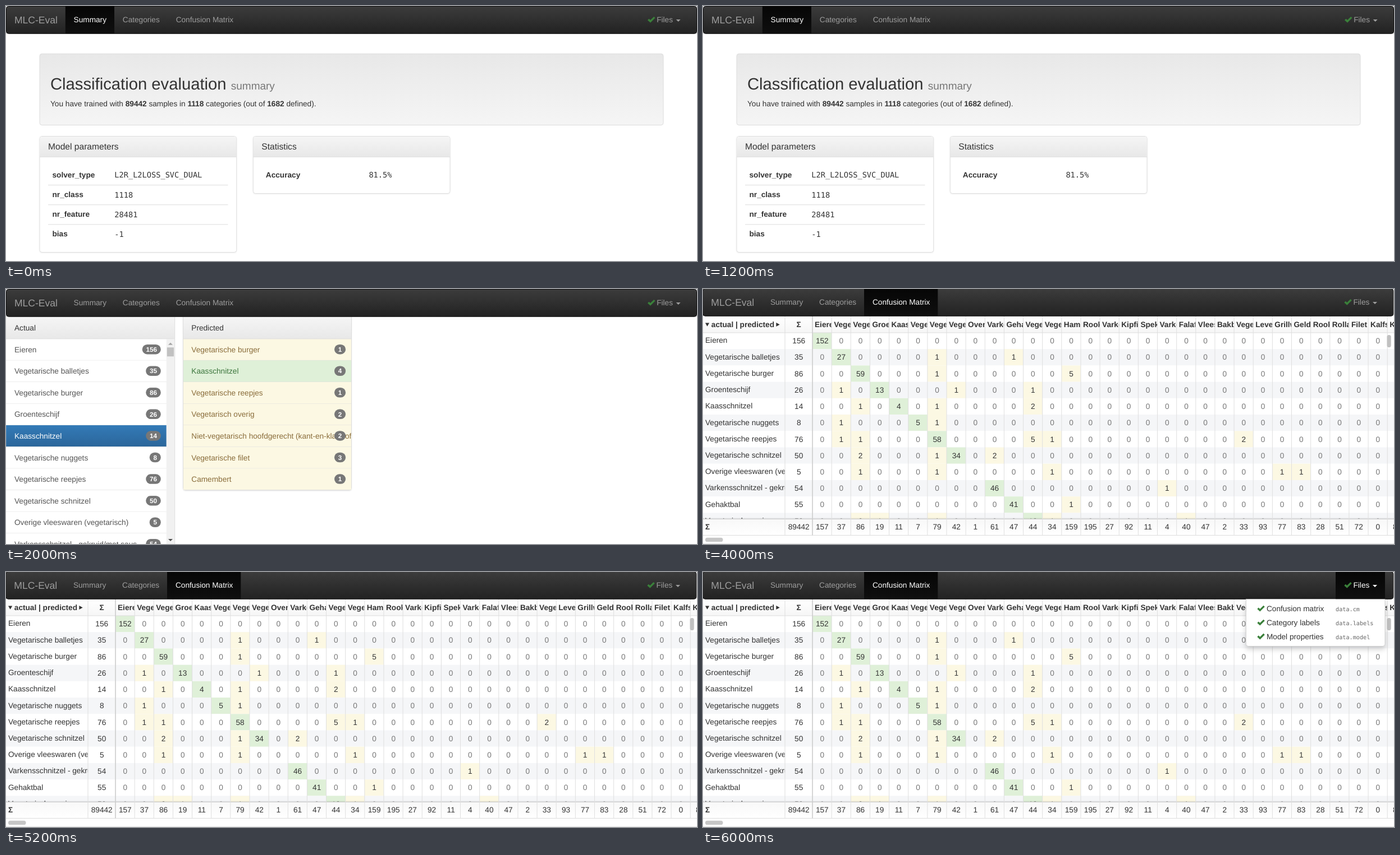
Recreate the animation shown at these times as an HTML page. Size 1231 by 455 pixels, loop 8000 ms.

```html
<!DOCTYPE html>
<html lang="en">
<head>
<meta charset="utf-8">
<title>MLC-Eval</title>
<style>
html, body { margin: 0; width: 100%; height: 100%; overflow: hidden; background: #fff; }
svg { display: block; width: 100%; height: 100%; }
text { font: 13.65px "Liberation Sans", Arial, sans-serif; fill: #333; text-rendering: geometricPrecision; }
.b { font-weight: 700; }
.mono { font-family: "DejaVu Sans Mono", monospace; }
.mid { text-anchor: middle; }
.h2 { font-size: 29.24px; }
.sub { font-size: 19px; fill: #777; }
.h3 { font-size: 15.6px; }
.brand { font-size: 17.55px; }
.nav { fill: #9d9d9d; }
.on { fill: #fff; }
.item { fill: #555; }
.warn { fill: #8a6d3b; }
.ok { fill: #3c763d; }
.zero { fill: #777; }
.file { font-size: 10.2px; fill: #666; }
.badge { font-size: 11.7px; font-weight: 700; fill: #fff; text-anchor: middle; }
.well { filter: drop-shadow(0 1px 1px rgba(0,0,0,.06)); }
.menu { filter: drop-shadow(0 5px 5px rgba(0,0,0,.18)); }
#summary, #categories, #files { animation: quarter 8s step-end infinite; }
#categories { animation-delay: -6s; }
#files { animation-delay: -2s; }
#matrix { animation: half 8s step-end -4s infinite; }
@keyframes quarter { 0% { visibility: visible; } 25%, 100% { visibility: hidden; } }
@keyframes half { 0% { visibility: visible; } 50%, 100% { visibility: hidden; } }
</style>
</head>
<body>
<svg viewBox="0 0 1231 455" preserveAspectRatio="none">
  <defs id="defs"></defs>
  <g id="summary"></g>
  <g id="categories"></g>
  <g id="matrix"></g>
  <g id="files"></g>
</svg>
<script>
const $ = id => document.getElementById(id);
const text = (x, y, s, cls = '') => `<text x="${x}" y="${y}" class="${cls}">${s}</text>`;
const rect = (x, y, w, h, fill, extra = '') =>
  `<rect x="${x}" y="${y}" width="${w}" height="${h}" fill="${fill}" ${extra}/>`;
const path = (d, fill, extra = '') => `<path d="${d}" fill="${fill}" ${extra}/>`;
const hline = (x, y, w, color = '#ddd') => rect(x, y - .5, w, 1, color);
const vline = (x, y, h, color = '#ddd') => rect(x - .5, y, 1, h, color);
const clip = (id, x, y, w, h) => `<clipPath id="${id}">${rect(x, y, w, h, '#000')}</clipPath>`;
const clipped = (id, body) => `<g clip-path="url(#${id})">${body}</g>`;
const gradient = (id, from, to) => `<linearGradient id="${id}" x2="0" y2="1">
  <stop stop-color="${from}"/><stop offset="1" stop-color="${to}"/></linearGradient>`;
const check = (x, y) =>
  path(`M${x} ${y + 6.2}l2.4 -2.5 2.6 2.4 6.2 -6.1 2.3 2.3 -8.5 8.5z`, '#3a803a');

// Navigation bar
const tabs = [['Summary', 120.6, 105.8, 87.2], ['Categories', 207.8, 193, 95], ['Confusion Matrix', 302.7, 287.7, 131.3]];

function filesTab(cls) {
  return check(1143, 19) + text(1159.2, 29.2, 'Files', cls) +
    path('M1193.7 23.9h8l-4 4z', cls === 'on' ? '#fff' : '#9d9d9d');
}

function navbar(active) {
  let s = rect(.5, .5, 1230, 48.8, 'url(#bar)', 'rx="4" stroke="#101010"');
  s += text(15, 30.6, 'MLC-Eval', 'nav brand');
  tabs.forEach(([name, x, left, width], i) => {
    if (i === active) s += rect(left, .5, width, 48.5, 'url(#tab)');
    s += text(x, 29.2, name, i === active ? 'on' : 'nav');
  });
  return s + filesTab('nav');
}

// Summary page
function panel(x, height, title, rows, valueX) {
  let s = rect(x, 232.5, 350.7, height, '#fff', 'rx="4" stroke="#ddd" class="well"');
  s += path(`M${x + .5} 269V236q0 -3 3 -3h343.7q3 0 3 3V269z`, 'url(#head)');
  s += hline(x, 269.3, 350.7) + text(x + 15, 256, title, 'h3');
  rows.forEach(([key, value], i) => {
    const y = 306 + i * 35.15;
    if (i) s += hline(x + 15, y - 21.6, 320.5);
    s += text(x + 22.5, y - .4, key, 'b') + text(valueX, y + .4, value, 'mono');
  });
  return s;
}

function summary() {
  return navbar(0) +
    rect(60, 85.3, 1111, 127.2, 'url(#jumbo)', 'rx="4" stroke="#dcdcdc"') +
    text(79, 149.4, 'Classification evaluation <tspan class="sub">summary</tspan>', 'h2') +
    text(79, 179.2, 'You have trained with <tspan class="b">89442</tspan> samples in ' +
      '<tspan class="b">1118</tspan> categories (out of <tspan class="b">1682</tspan> defined).') +
    panel(60, 207, 'Model parameters', [['solver_type', 'L2R_L2LOSS_SVC_DUAL'],
      ['nr_class', '1118'], ['nr_feature', '28481'], ['bias', '-1']], 193.3) +
    panel(440.3, 102, 'Statistics', [['Accuracy', '81.5%']], 646.4);
}

// Categories page
const step = 38.57;
const actual = [['Eieren', 156], ['Vegetarische balletjes', 35], ['Vegetarische burger', 86],
  ['Groenteschijf', 26], ['Kaasschnitzel', 14], ['Vegetarische nuggets', 8],
  ['Vegetarische reepjes', 76], ['Vegetarische schnitzel', 50],
  ['Overige vleeswaren (vegetarisch)', 5], ['Varkensschnitzel - gekruid/met saus', 54]];
const predicted = [['Vegetarische burger', 1], ['Kaasschnitzel', 4], ['Vegetarische reepjes', 1],
  ['Vegetarisch overig', 2], ['Niet-vegetarisch hoofdgerecht (kant-en-klaar of bereid)', 2],
  ['Vegetarische filet', 3], ['Camembert', 1]];

function badge(right, y, n) {
  const w = 13.6 + 6.51 * String(n).length;
  return rect(right - w, y - 8.8, w, 17.5, '#777', 'rx="8.75"') + text(right - w / 2, y + 4.2, n, 'badge');
}

function list(items, x, width, look) {
  return items.map(([name, n], i) => {
    const y = 88.8 + i * step, [fill, cls] = look(i);
    return rect(x, y, width, step, fill) + hline(x, y + step, width) +
      text(x + 14.8, y + 23.9, name, cls) + badge(x + width - 10, y + 18.9, n);
  }).join('');
}

function categories() {
  const left = rect(0, 50, 300.5, 39, 'url(#head)') + text(15, 73.8, 'Actual') +
    list(actual, .2, 285.6, i => i === 4 ? ['url(#blue)', 'on'] : ['#fff', 'item']) +
    hline(0, 88.9, 300.5) +
    rect(285.8, 89.4, 14.6, 366, '#f1f1f1') + rect(286.8, 104.3, 12.2, 16, '#c1c1c1') +
    path('M289 99.8l4 -4 4 4z', '#a3a3a3') + path('M289 446l4 4 4 -4z', '#505050') +
    vline(300.7, 50, 405);
  const right = rect(315.5, 46, 300, 313.3, '#fff', 'rx="4" stroke="#ddd" class="well"') +
    clipped('predictedBox', rect(316, 50, 299, 39, 'url(#head)') + text(330.3, 73.8, 'Predicted') +
      list(predicted, 315.5, 299.6, i => i === 1 ? ['#dff0d8', 'ok'] : ['#fcf8e3', 'warn']) +
      hline(316, 88.9, 299));
  return left + right + navbar(-1);
}

// Confusion matrix page
const colX = 195, colW = 34.14, rowY = 78, rowH = 29.22, footY = 410.5;
const labels = [...actual, ['Gehaktbal', 55], ['Vegetarisch overig', 59]];
const heads = ['Eieren', 'Vegetarische', 'Vegetarische', 'Groenteschijf', 'Kaasschnitzel', 'Vegetarische',
  'Vegetarische', 'Vegetarische', 'Overige', 'Varkensschnitzel', 'Gehaktbal', 'Vegetarisch', 'Vegetarische',
  'Ham', 'Rookvlees', 'Varkensvlees', 'Kipfilet', 'Spek', 'Varkensvlees', 'Falafel', 'Vleeswaren',
  'Bakbloedworst', 'Vegetarische', 'Leverworst', 'Grillworst', 'Gelderse', 'Rookworst', 'Rollade',
  'Filet', 'Kalfsvlees', 'Kip'];
const cells = [{0: 152}, {1: 27, 6: 1, 10: 1}, {2: 59, 6: 1, 13: 5}, {1: 1, 3: 13, 7: 1, 11: 1},
  {2: 1, 4: 4, 6: 1, 11: 2}, {1: 1, 5: 5, 6: 1}, {1: 1, 2: 1, 6: 58, 11: 5, 12: 1, 22: 2},
  {2: 2, 6: 1, 7: 34, 9: 2}, {2: 1, 6: 1, 12: 1, 24: 1, 25: 1}, {9: 46, 18: 1},
  {10: 41, 13: 1}, {2: 2, 3: 1, 6: 1, 11: 18, 12: 1, 19: 1}];
const totals = '157 37 86 19 11 7 79 42 1 61 47 44 34 159 195 27 92 11 4 40 47 2 33 93 77 83 28 51 72 0 80'.split(' ');
const colMid = c => colX + .2 + colW * (c + .5);

function matrixRows() {
  return labels.map(([name, sum], r) => {
    const y = rowY + r * rowH, base = y + 19.2;
    let s = rect(0, y, 1231, rowH, r % 2 ? '#f5f6f8' : '#fff') +
      clipped('labelBox', text(4, base - .8, name)) + text(170.7, base, sum, 'mid');
    heads.forEach((_, c) => {
      const n = cells[r][c] || 0;
      if (n) s += rect(colX + c * colW, y, colW, rowH, r === c ? '#dff0d8' : '#fcf8e3');
      s += text(colMid(c), base, n, n ? 'mid' : 'mid zero');
    });
    return s;
  }).join('');
}

function matrix() {
  let s = clipped('bodyBox', matrixRows());
  s += rect(0, 48, 1231, 30, 'url(#gridHead)') + hline(0, 78, 1231);
  s += path('M4 60.5h7.2l-3.6 6.2z', '#333') + text(14.8, 67.7, 'actual | predicted', 'b') +
    path('M130.3 60l6.4 3.5 -6.4 3.5z', '#333') + text(170.7, 67.7, 'Σ', 'b mid');
  heads.forEach((h, c) => s += clipped('col' + c, text(colX + 4 + c * colW, 67.7, h, 'b')));
  s += rect(0, footY - 3, 1231, 3, 'url(#shade)') + rect(0, footY, 1231, 29, 'url(#gridFoot)') +
    hline(0, footY, 1231, '#ccc') + hline(0, 439.5, 1231);
  s += text(4, 429.3, 'Σ', 'b') + text(170.7, 429.3, '89442', 'mid');
  totals.forEach((n, c) => {
    s += text(colMid(c), 429.3, n, 'mid');
    if (c) s += vline(colX + c * colW, 48, 391.5, '#dfdfdf');
  });
  s += vline(146, 48, 391.5) + rect(194.2, 48, 1.6, 391.5, '#ccc');
  s += rect(1218.5, 82, 7.2, 22, '#c1c1c1', 'rx="3.6"') + rect(4, 443.8, 31.5, 7.2, '#c6c6c6', 'rx="3.6"') +
    hline(0, 454.7, 1231);
  return s + `<g transform="translate(-.7 -1)">${navbar(2)}</g>`;
}

// Files menu
function filesMenu() {
  let s = path('M967.3 48.5h247.7v80q0 4 -4 4h-239.7q-4 0 -4 -4z', '#fff', 'stroke="#ccc" class="menu"');
  s += `<g transform="translate(-.7 -1)">${rect(1127.7, .5, 88, 48.7, 'url(#tab)')}${filesTab('on')}</g>`;
  [['Confusion matrix', 'cm'], ['Category labels', 'labels'], ['Model properties', 'model']].forEach(([name, ext], i) => {
    const y = 70 + i * 24.9;
    s += check(987.3, y - 10.2) + text(1004, y, name) + text(1127, y, 'data.' + ext, 'mono file');
  });
  return s;
}

$('defs').innerHTML = gradient('bar', '#3c3c3c', '#222') + gradient('tab', '#060606', '#0f0f0f') +
  gradient('jumbo', '#e8e8e8', '#f5f5f5') + gradient('head', '#f5f5f5', '#e8e8e8') +
  gradient('blue', '#337ab7', '#2b669a') + gradient('gridHead', '#fff', '#f6f6f6') +
  gradient('gridFoot', '#f8f8f8', '#fff') + gradient('shade', 'rgba(0,0,0,0)', 'rgba(0,0,0,.12)') +
  clip('predictedBox', 316, 50, 299, 308.9) + clip('labelBox', 0, 78, 146, 333) +
  clip('bodyBox', 0, 78, 1231, 333) +
  heads.map((_, c) => clip('col' + c, colX + c * colW, 48, colW, 30)).join('');
$('summary').innerHTML = summary();
$('categories').innerHTML = categories();
$('matrix').innerHTML = matrix();
$('files').innerHTML = filesMenu();
</script>
</body>
</html>
```
